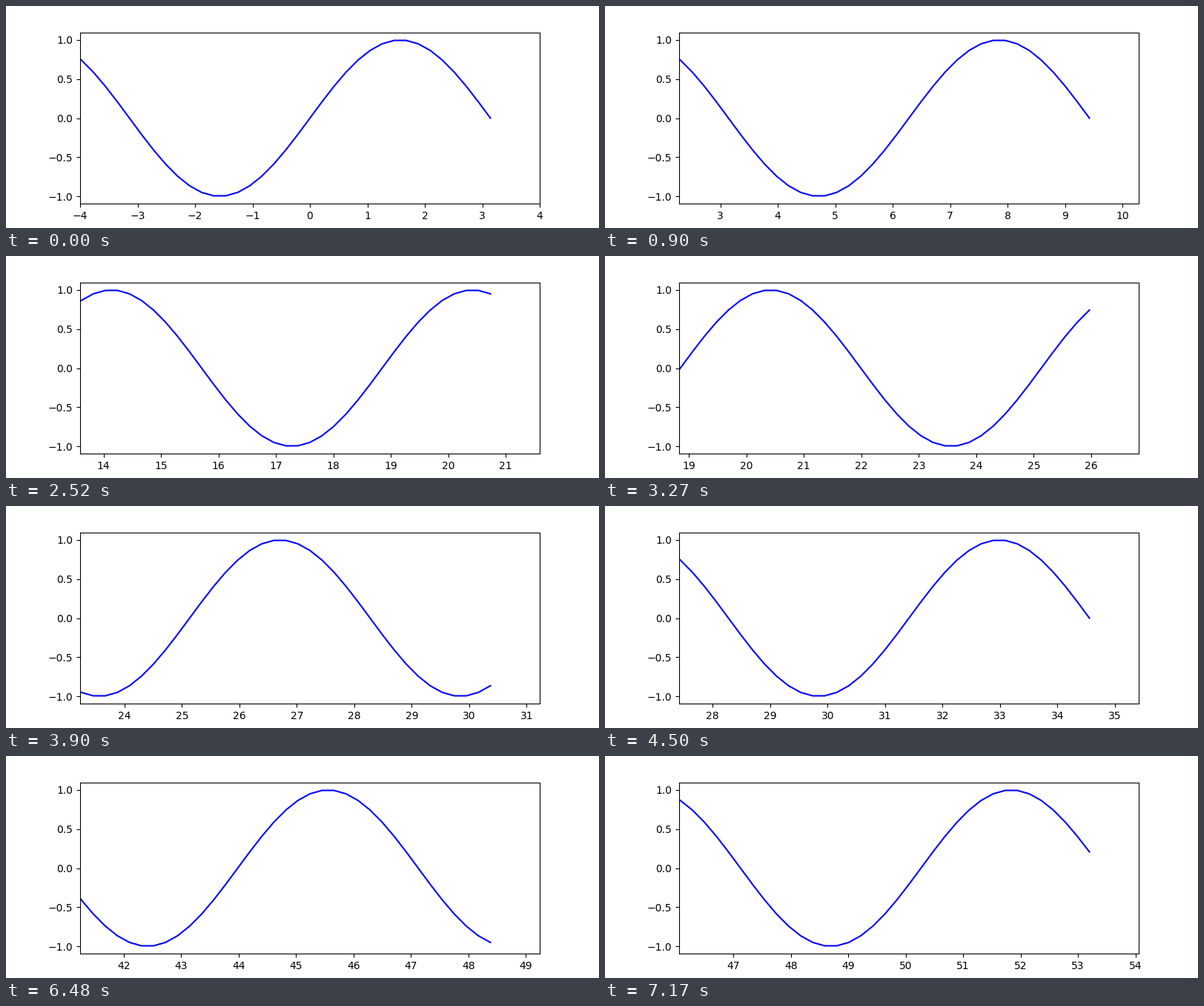
These frames come from a looping animation (800 by 300 pixels, 7.2 s). A matplotlib script:

```python
import numpy as np
import matplotlib.pyplot as plt
from matplotlib.animation import FuncAnimation

FRAMES = 240
INTERVAL = 30
STEP = np.pi / 15   # sample spacing, also the scroll per frame
SAMPLES = 46        # one and a half periods

fig, ax = plt.subplots(figsize=(8, 3), dpi=100)
line, = ax.plot([], [], color="blue")
base = np.linspace(-2 * np.pi, np.pi, SAMPLES)


def update(i):
    shift = i * STEP
    x = base + shift
    line.set_data(x, np.sin(x))
    ax.relim()
    ax.autoscale_view(scalex=False)
    ax.set_xlim(shift - 4, shift + 4)
    return line,


anim = FuncAnimation(fig, update, frames=FRAMES, init_func=lambda: update(0),
                     interval=INTERVAL, repeat=True, repeat_delay=0, blit=False)
plt.show()
```
